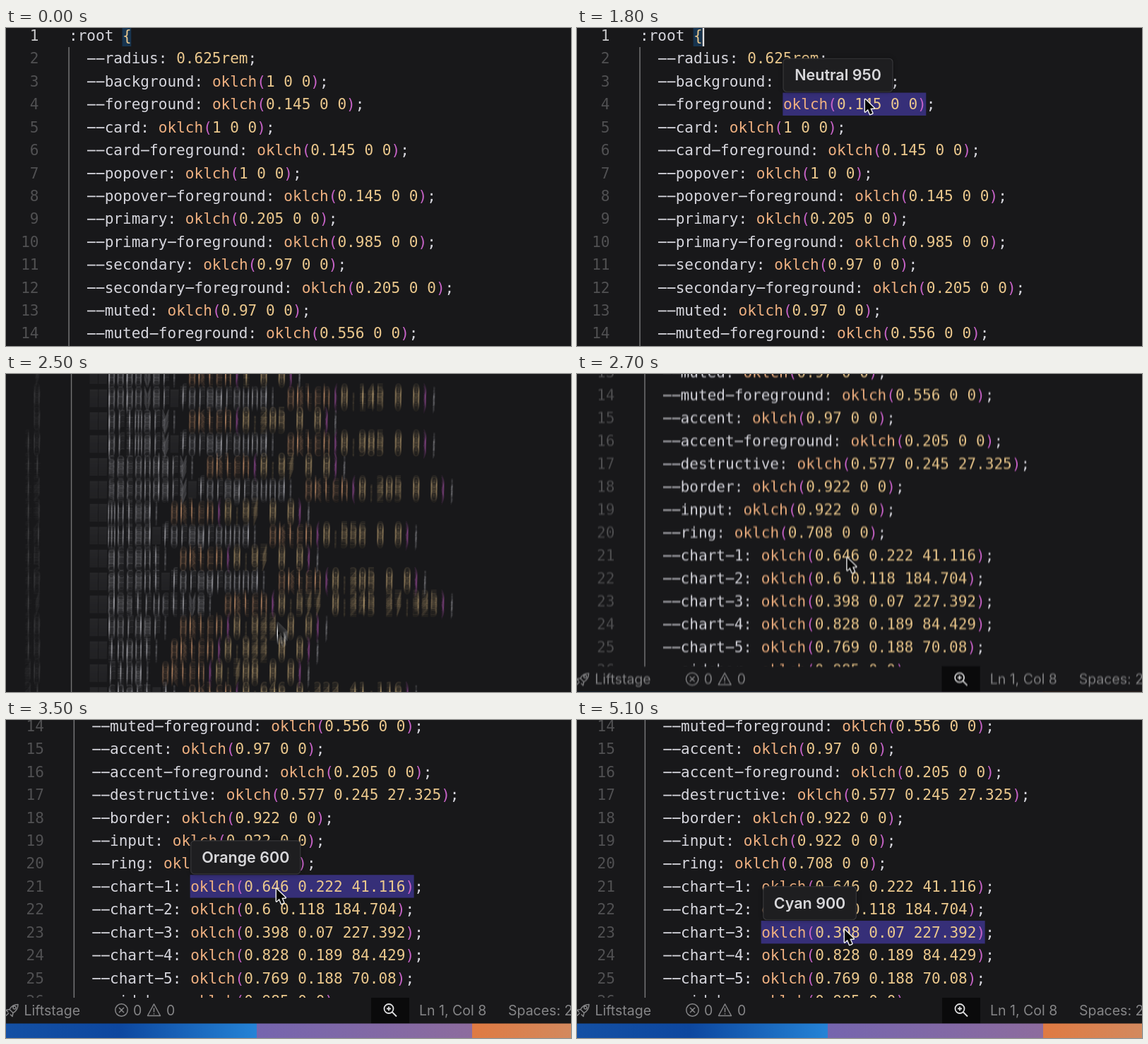
Animation of 800 by 450 pixels, one loop 5200 ms. Source, as an HTML page with a canvas:

```html
<!DOCTYPE html>
<html lang="en">
<head>
<meta charset="utf-8">
<title>Color hover</title>
<style>
  html, body { margin: 0; width: 100%; height: 100%; overflow: hidden; background: #18181a; }
  canvas { display: block; }
</style>
</head>
<body>
<canvas id="stage" width="800" height="450"></canvas>
<script>
const LOOP = 5200, STEP = 100;
const LEFT = 89, CELL = 12.68, ROW = 32.42, FIRST = 10.5;
const PAN = { start: 2396, rate: 0.0156, x: 7.3, y: 423.5 };
const SHUTTER = 11, SAMPLES = 14;
const BAR = 816.5, BAR_HEIGHT = 36.5;
const BLINK = { start: 130, period: 770 };

const MONO = '21.06px "DejaVu Sans Mono", monospace';
const LABEL = '600 21.5px Inter, sans-serif';
const STATUS = '19.5px Inter, sans-serif';
const COLOR = {
  back: '#18181a', text: '#d6d6dd', call: '#efb080', number: '#ebc88d',
  paren: '#c863c8', gutter: '#505052', guide: '#747476',
  select: '#362f78', brace: '#17344f', status: '#858587'
};

const LINES = [':root {'].concat(`radius: 0.625rem
background: oklch(1 0 0)
foreground: oklch(0.145 0 0)
card: oklch(1 0 0)
card-foreground: oklch(0.145 0 0)
popover: oklch(1 0 0)
popover-foreground: oklch(0.145 0 0)
primary: oklch(0.205 0 0)
primary-foreground: oklch(0.985 0 0)
secondary: oklch(0.97 0 0)
secondary-foreground: oklch(0.205 0 0)
muted: oklch(0.97 0 0)
muted-foreground: oklch(0.556 0 0)
accent: oklch(0.97 0 0)
accent-foreground: oklch(0.205 0 0)
destructive: oklch(0.577 0.245 27.325)
border: oklch(0.922 0 0)
input: oklch(0.922 0 0)
ring: oklch(0.708 0 0)
chart-1: oklch(0.646 0.222 41.116)
chart-2: oklch(0.6 0.118 184.704)
chart-3: oklch(0.398 0.07 227.392)
chart-4: oklch(0.828 0.189 84.429)
chart-5: oklch(0.769 0.188 70.08)
sidebar: oklch(0.985 0 0)`.split('\n').map(s => `  --${s};`));

const HOVERS = [
  { label: 'White', row: 3, x: 333, w: 94, on: 520, off: 1230 },
  { label: 'Neutral 950', row: 4, x: 291.5, w: 156, on: 1500, off: 2060 },
  { label: 'Orange 600', row: 21, x: 254, w: 156, on: 2780, off: 3560 },
  { label: 'Teal 600', row: 22, x: 266, w: 122, on: 3860, off: 4460 },
  { label: 'Cyan 900', row: 23, x: 256, w: 132.5, on: 4760, off: LOOP }
];

// Pointer moves: start, end, destination
const MOVES = [
  [150, 480, 412, 68],
  [1150, 1400, 407, 100],
  [1980, 2700, 374.7, 661.5],
  [3500, 3720, 372.7, 695.5],
  [4400, 4640, 370.7, 719.5]
];

const stage = document.getElementById('stage').getContext('2d');
const layer = document.createElement('canvas');
layer.width = 800;
layer.height = 450;
const g = layer.getContext('2d');

const rowY = n => FIRST + (n - 1) * ROW;
const colX = n => LEFT + n * CELL;

function rect(x, y, w, h, color) {
  g.fillStyle = color;
  g.fillRect(x, y, w, h);
}

function write(text, x, y, color, font, align = 'left') {
  g.font = font;
  g.fillStyle = color;
  g.textAlign = align;
  g.fillText(text, x, y);
}

function path(points, close) {
  g.beginPath();
  points.forEach(([x, y]) => g.lineTo(x, y));
  if (close) g.closePath();
}

function panAt(t) {
  const s = Math.max(0, t - PAN.start) * PAN.rate;
  return 1 - (1 + s) * Math.exp(-s);
}

function pointerAt(t) {
  let x = 440, y = -40;
  for (const [from, to, endX, endY] of MOVES) {
    const u = Math.min(1, Math.max(0, (t - from) / (to - from)));
    const k = (1 - Math.cos(Math.PI * u)) / 2;
    x += (endX - x) * k;
    y += (endY - y) * k;
  }
  return [x, y];
}

function codeColor(token) {
  if (token === 'oklch') return COLOR.call;
  if (/^[()]/.test(token)) return COLOR.paren;
  if (/^[\d{]/.test(token)) return COLOR.number;
  return COLOR.text;
}

function drawCode(line, y) {
  const split = line.indexOf(': ') + 1;
  const value = line.slice(split).match(/oklch|[()]|[\d.]+(rem)?|[{;]|\s+/g) || [];
  const tokens = split ? [line.slice(0, split), ...value] : [line.slice(0, -1), '{'];
  let col = 0;
  for (const token of tokens) {
    const color = codeColor(token);
    write(token.replace(/-/g, ' '), colX(col), y + 7.5, color, MONO);
    for (let i = 0; i < token.length; i++) {
      if (token[i] === '-') rect(colX(col + i) + 0.6, y, 11.8, 1.8, color);
    }
    col += token.length;
  }
}

function drawEditor(hover, t) {
  g.save();
  g.beginPath();
  g.rect(-10, -10, 840, BAR + 10);
  g.clip();
  rect(colX(6) - 0.5, -3, CELL, 29, COLOR.brace);
  rect(LEFT - 0.7, 27, 1.5, BAR, COLOR.guide);
  if (hover) {
    const line = LINES[hover.row - 1], col = line.indexOf('oklch');
    rect(colX(col) - 0.5, rowY(hover.row) - 16.2, (line.length - 1 - col) * CELL, 32.4, COLOR.select);
  }
  LINES.forEach((line, i) => {
    const y = rowY(i + 1);
    write(i + 1, 46.5, y + 7.5, i ? COLOR.gutter : '#c8c8ca', MONO, 'right');
    drawCode(line, y);
  });
  const phase = (t - BLINK.start + BLINK.period) % BLINK.period;
  if (phase < BLINK.period / 2) rect(colX(7), -3, 2.4, 29, '#e2e2e4');
  g.restore();
}

function drawStatus() {
  const y = BAR + 17.5, base = y + 7;
  g.save();
  g.translate(-PAN.x, 0);
  rect(509 + 8, BAR, 54, BAR_HEIGHT, '#0a0a0b');
  write('Liftstage', 25.5, base, COLOR.status, STATUS);
  write('0', 180, base, COLOR.status, STATUS);
  write('0', 227, base, COLOR.status, STATUS);
  write('Ln 1, Col 8', 585, base, COLOR.status, STATUS);
  write('Spaces: 2', 711, base, COLOR.status, STATUS);

  g.strokeStyle = COLOR.status;
  g.lineWidth = 1.5;
  g.lineJoin = 'round';
  g.beginPath();
  g.arc(163.5, y, 8.7, 0, 7);
  g.moveTo(160, y - 3.5); g.lineTo(167, y + 3.5);
  g.moveTo(167, y - 3.5); g.lineTo(160, y + 3.5);
  g.stroke();
  path([[209.5, y - 8.5], [218.5, y + 8], [200.5, y + 8]], true);
  g.moveTo(209.5, y - 3); g.lineTo(209.5, y + 3);
  g.moveTo(209.5, y + 4.5); g.lineTo(209.5, y + 6);
  g.stroke();

  g.beginPath();
  g.moveTo(5, y - 1);
  g.quadraticCurveTo(9, y - 8, 17, y - 8);
  g.quadraticCurveTo(17, y, 10, y + 4);
  g.closePath();
  g.moveTo(5, y - 1); g.lineTo(0, y); g.lineTo(3, y + 3);
  g.moveTo(10, y + 4); g.lineTo(9, y + 9); g.lineTo(6, y + 6);
  g.moveTo(4, y + 4); g.lineTo(0, y + 8);
  g.moveTo(14, y - 3.5);
  g.arc(12, y - 3.5, 2, 0, 7);
  g.stroke();

  g.strokeStyle = '#dededf';
  g.lineWidth = 1.8;
  g.beginPath();
  g.arc(542, y - 2, 6.5, 0, 7);
  g.moveTo(547, y + 3); g.lineTo(553, y + 9);
  g.moveTo(539, y - 2); g.lineTo(545, y - 2);
  g.moveTo(542, y - 5); g.lineTo(542, y + 1);
  g.stroke();

  const top = BAR + BAR_HEIGHT;
  const blue = g.createLinearGradient(0, 0, 355, 0);
  blue.addColorStop(0, '#1450a4');
  blue.addColorStop(0.45, '#0d479f');
  blue.addColorStop(1, '#2583d6');
  rect(-10, top, 365, 40, blue);
  const violet = g.createLinearGradient(355, 0, 660, 0);
  violet.addColorStop(0, '#7565ae');
  violet.addColorStop(1, '#8d6c9e');
  rect(355, top, 305, 40, violet);
  const orange = g.createLinearGradient(660, 0, 810, 0);
  orange.addColorStop(0, '#df7a42');
  orange.addColorStop(1, '#d28a60');
  rect(660, top, 160, 40, orange);
  g.restore();
}

function drawTooltip({ label, row, x, w }) {
  const y = rowY(row) - 65;
  g.save();
  g.shadowColor = 'rgba(0,0,0,.4)';
  g.shadowBlur = 6;
  g.beginPath();
  g.roundRect(x + 0.5, y + 0.5, w - 1, 47, 5);
  g.fillStyle = '#1e1e20';
  g.fill();
  g.restore();
  g.strokeStyle = '#37373a';
  g.lineWidth = 1.2;
  g.stroke();
  write(label, x + w / 2, y + 31.5, '#d8d8db', LABEL, 'center');
}

function drawPointer(x, y) {
  g.save();
  g.translate(x, y);
  path([[1, 1], [1, 18.5], [5, 14.8], [8, 22], [11.3, 20.6], [8.3, 13.8], [13.7, 13.6]], true);
  g.lineJoin = 'round';
  g.lineWidth = 2.8;
  g.strokeStyle = '#f2f2f2';
  g.stroke();
  g.fillStyle = '#050505';
  g.fill();
  g.restore();
}

function drawScene(t, hover) {
  const pan = panAt(t);
  g.setTransform(1, 0, 0, 1, 0, 0);
  rect(0, 0, 800, 450, COLOR.back);
  g.translate(PAN.x * pan, -PAN.y * pan);
  drawEditor(hover, t);
  drawStatus();
  if (hover) drawTooltip(hover);
  drawPointer(...pointerAt(t));
}

function render(t) {
  const hover = HOVERS.find(h => t >= h.on && t < h.off);
  const travel = PAN.y * (panAt(t + SHUTTER / 2) - panAt(t - SHUTTER / 2));
  const count = travel > 0.5 ? SAMPLES : 1;
  for (let i = 0; i < count; i++) {
    const shift = count > 1 ? (i / (count - 1) - 0.5) * SHUTTER : 0;
    drawScene(t + shift, hover);
    stage.globalAlpha = 1 / (i + 1);
    stage.drawImage(layer, 0, 0);
  }
}

const start = performance.now();
let shown = -1;
function tick() {
  const t = Math.floor(((performance.now() - start) % LOOP) / STEP) * STEP;
  if (t !== shown) render(shown = t);
  requestAnimationFrame(tick);
}
tick();
</script>
</body>
</html>
```
